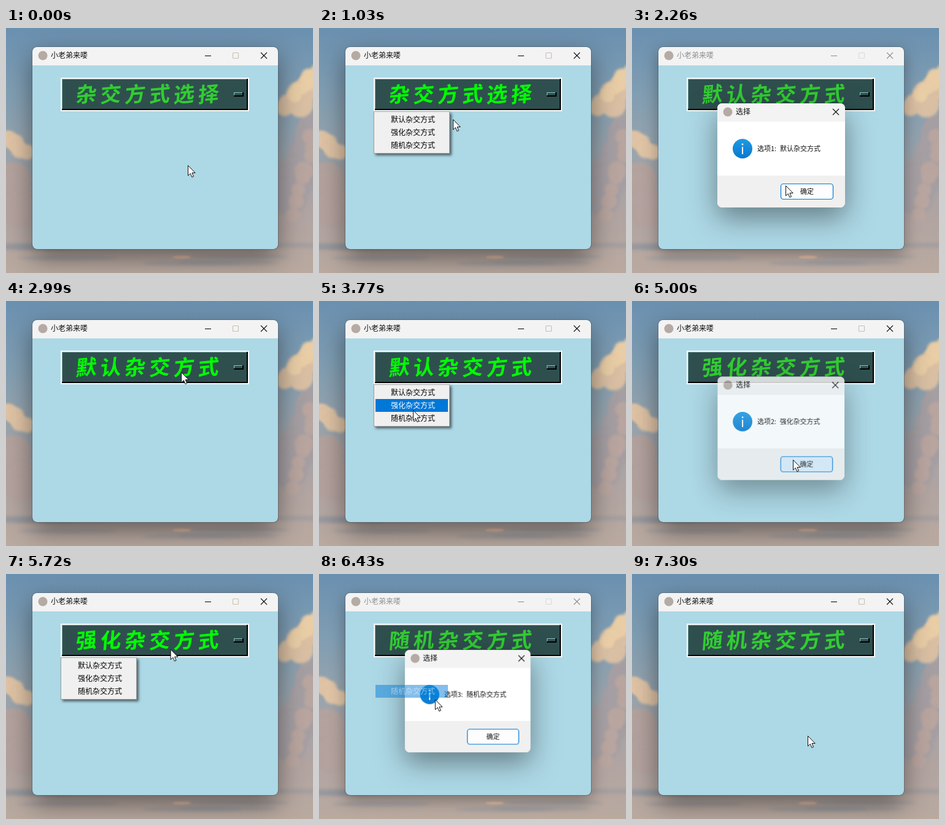
Recreate the animation shown at these times as an HTML page with a canvas. Size 500 by 400 pixels, loop 7370 ms.

```html
<!DOCTYPE html>
<html lang="zh">
<head>
<meta charset="utf-8">
<style>
html, body { margin: 0; width: 100%; height: 100%; overflow: hidden; background: #8a9aa8; }
canvas { display: block; width: 100vw; height: 100vh; }
</style>
</head>
<body>
<canvas id="stage" width="500" height="400"></canvas>
<script>
const W = 500, H = 400, LOOP = 7370;
const CJK = '"Noto Sans CJK SC", "Noto Sans CJK", sans-serif';
const BLUE = '#0078d7';
const OPTIONS = ['默认杂交方式', '强化杂交方式', '随机杂交方式'];
const START_LABEL = '杂交方式选择';
const OPEN_DELAY = 50, OPEN_TIME = 250, CLOSE_TIME = 170;

// Per option: when the menu opens, the item is picked and the dialog closes,
// and where the pointer clicks
const ROUNDS = [
  { menu: 670, pick: 1330, close: 2450, item: [178, 148], ok: [250, 257] },
  { menu: 3190, pick: 3870, close: 4975, item: [153, 178], ok: [262, 259] },
  { menu: 5600, pick: 6250, close: 6960, item: [167, 189], ok: [268, 261] }
];
const REST = [296, 224], BUTTON = [286, 113], MENU_EDGE = [218, 149], END = [286, 264];

const clamp = v => Math.max(0, Math.min(1, v));
const smooth = k => k * k * (3 - 2 * k);
const easeOut = k => 1 - (1 - k) ** 3;
const mix = (a, b, k) => a + (b - a) * k;

const stops = [
  { t: 50, p: REST },
  ...ROUNDS.flatMap(({ menu, pick, close, item, ok }) => [
    { t: menu - 150, p: BUTTON },
    { t: menu, p: BUTTON },
    { t: mix(menu, pick, 0.545), p: MENU_EDGE },
    { t: pick - 100, p: item },
    { t: pick + 40, p: item },
    { t: close - 200, p: ok },
    { t: close + 30, p: ok }
  ]),
  { t: 7130, p: END }
];

const ctx = document.getElementById('stage').getContext('2d');

function layer() {
  const c = document.createElement('canvas');
  c.width = W;
  c.height = H;
  return c.getContext('2d');
}

function rect(g, color, x, y, w, h) {
  g.fillStyle = color;
  g.fillRect(x, y, w, h);
}

function disc(g, color, x, y, rx, ry = rx) {
  g.fillStyle = color;
  g.beginPath();
  g.ellipse(x, y, rx, ry, 0, 0, Math.PI * 2);
  g.fill();
}

function rounded(g, x, y, w, h, r) {
  g.beginPath();
  g.roundRect(x, y, w, h, r);
}

// Opaque rounded panel with a soft drop shadow
function panel(g, color, x, y, w, h, alpha, blur, drop) {
  g.save();
  g.shadowColor = `rgba(0,0,0,${alpha})`;
  g.shadowBlur = blur;
  g.shadowOffsetY = drop;
  rounded(g, x, y, w, h, 8);
  g.fillStyle = color;
  g.fill();
  g.restore();
}

function text(g, str, x, y, size, color, align = 'left') {
  g.font = `${size}px ${CJK}`;
  g.textAlign = align;
  g.fillStyle = color;
  g.fillText(str, x, y);
}

function line(g, color, x1, y1, x2, y2) {
  g.strokeStyle = color;
  g.lineWidth = 1.1;
  g.beginPath();
  g.moveTo(x1, y1);
  g.lineTo(x2, y2);
  g.stroke();
}

function cross(g, color, x, y) {
  line(g, color, x, y, x + 10, y + 10);
  line(g, color, x + 10, y, x, y + 10);
}

// Raised face: light top and left, black bottom and right
function bevel(x, y, w, h, light) {
  rect(ctx, '#000', x, y, w, h);
  rect(ctx, light, x, y, w - 2, h - 2);
  rect(ctx, '#2f4f4f', x + 1, y + 1, w - 3, h - 3);
}

function pointer(t) {
  const i = stops.findIndex(s => s.t > t);
  if (i < 0) return END;
  if (i === 0) return REST;
  const a = stops[i - 1], b = stops[i];
  const k = smooth((t - a.t) / (b.t - a.t));
  return [mix(a.p[0], b.p[0], k), mix(a.p[1], b.p[1], k)];
}

function paintSky() {
  const g = layer();
  let seed = 7;
  const jitter = size => {
    seed = (seed * 16807) % 2147483647;
    return (seed / 2147483647 - 0.5) * 2 * size;
  };
  const bank = (color, x1, y1, x2, y2, count, r) => {
    for (let i = 0; i < count; i++) {
      const k = i / (count - 1);
      disc(g, color, mix(x1, x2, k) + jitter(r / 2), mix(y1, y2, k) + jitter(r / 2), r + jitter(r / 3));
    }
  };

  const grad = g.createLinearGradient(0, 0, 0, H);
  ['#6a90b0', '#7f9db2', '#98a4ad', '#b0a4a2', '#b9a99f']
    .forEach((color, i, all) => grad.addColorStop(i / (all.length - 1), color));
  rect(g, grad, 0, 0, W, H);

  g.filter = 'blur(2px)';
  bank('#a59fa3', 510, 150, 460, 270, 14, 24);
  bank('#b9a59f', 500, 180, 470, 300, 8, 12);
  bank('#d9bfa3', 510, 85, 462, 128, 14, 17);
  bank('#e8cda6', 505, 70, 470, 112, 10, 10);
  bank('#b3a29e', 0, 225, 28, 300, 12, 20);
  bank('#dfc3a5', 0, 180, 30, 198, 10, 11);
  for (let i = 0; i < 9; i++) {
    disc(g, 'rgba(140,148,158,.4)', W / 2 + jitter(W / 2), 370 + jitter(16), 80, 4);
  }
  g.filter = 'blur(1px)';
  disc(g, '#dcb7a0', 286, 374, 15, 2.5);
  return g.canvas;
}

function paintWindow(active) {
  const ink = active ? '#111' : '#8f8f8f';
  panel(ctx, '#add8e6', 43, 31, 400, 330, active ? 0.45 : 0.34, active ? 42 : 26, active ? 15 : 8);
  rounded(ctx, 43, 31, 400, 30, [8, 8, 0, 0]);
  ctx.fillStyle = '#f3f3f3';
  ctx.fill();
  rounded(ctx, 42.5, 30.5, 401, 331, 8);
  ctx.strokeStyle = 'rgba(70,80,90,.45)';
  ctx.lineWidth = 1;
  ctx.stroke();

  disc(ctx, '#b5aaa4', 60, 45, 7.5);
  text(ctx, '小老弟来喽', 73, 49, 12, ink);
  line(ctx, ink, 324, 45.5, 334, 45.5);
  ctx.strokeStyle = active ? '#c8bfb4' : '#d6dcdc';
  rounded(ctx, 369.5, 40.5, 9, 9, 1);
  ctx.stroke();
  cross(ctx, ink, 415, 40);
}

function paintButton(label, hot) {
  rect(ctx, '#f7fafa', 89, 81, 307, 55);
  bevel(91, 83, 303, 51, '#7fa3a3');
  bevel(371, 105, 16, 7, '#8fc0c0');

  // slanted bold strokes give the brush-like lettering
  ctx.font = `700 34px ${CJK}`;
  ctx.textAlign = 'center';
  ctx.fillStyle = hot ? '#00ff00' : '#32cd32';
  [...label].forEach((ch, i) => {
    ctx.save();
    ctx.transform(1, -0.09, -0.08, 1, 131 + i * 39.8, 108);
    ctx.fillText(ch, 0, 12.5);
    ctx.restore();
  });
}

function paintItem(i, lit) {
  if (lit) rect(ctx, BLUE, 92, 139 + i * 21, 118, 21);
  text(ctx, OPTIONS[i], 117, 154 + i * 21, 12, lit ? '#fff' : '#000');
}

function paintMenu(age, x, y) {
  ctx.save();
  ctx.globalAlpha = clamp(age / 120);
  ctx.save();
  ctx.shadowColor = 'rgba(0,0,0,.55)';
  ctx.shadowBlur = 4;
  ctx.shadowOffsetX = ctx.shadowOffsetY = 2.5;
  rect(ctx, '#a0a0a0', 89, 136, 124, 69);
  ctx.restore();
  rect(ctx, '#f0f0f0', 90, 137, 122, 67);
  const row = x >= 92 && x < 210 ? Math.floor((y - 139) / 21) : -1;
  OPTIONS.forEach((_, i) => paintItem(i, i === row));
  ctx.restore();
}

const dialog = layer();

function paintDialog(n, hover) {
  const g = dialog, ink = '#111';
  g.clearRect(0, 0, W, H);
  panel(g, '#fff', 139, 123, 208, 170, 0.42, 46, 17);
  rounded(g, 139, 123, 208, 30, [8, 8, 0, 0]);
  g.fillStyle = '#f3f3f3';
  g.fill();
  rounded(g, 139, 241, 208, 52, [0, 0, 8, 8]);
  g.fillStyle = '#f0f0f0';
  g.fill();
  disc(g, '#b5aaa4', 156, 137, 7.5);
  text(g, '选择', 169, 141, 12, ink);
  cross(g, ink, 327, 132);

  const blue = g.createLinearGradient(0, 181, 0, 213);
  blue.addColorStop(0, '#1f9ae3');
  blue.addColorStop(1, '#0a78cf');
  disc(g, blue, 180, 197, 16);
  disc(g, '#fff', 180, 190, 1.4);
  rect(g, '#fff', 179, 194, 2, 12);
  text(g, `选项${n + 1}:`, 204, 201, 11, ink);
  text(g, OPTIONS[n], 241, 201, 11, ink);

  rounded(g, 242.5, 254.5, 85, 25, 4);
  g.fillStyle = hover ? '#d9ebf9' : '#fdfdfd';
  g.fill();
  g.strokeStyle = BLUE;
  g.lineWidth = 1.2;
  g.stroke();
  text(g, '确定', 285, 271, 11, ink, 'center');
}

function showDialog(t, n) {
  const { pick, close } = ROUNDS[n];
  const age = t - pick - OPEN_DELAY;
  const gone = clamp((t - close) / CLOSE_TIME);
  if (age < 0 || gone === 1) return;
  const scale = mix(0.85, 1, easeOut(clamp(age / OPEN_TIME))) * (1 - 0.04 * gone);
  paintDialog(n, t > close - 180);
  ctx.save();
  ctx.globalAlpha = clamp(age / 110) * (1 - gone);
  ctx.translate(191, 180);
  ctx.scale(scale, scale);
  ctx.drawImage(dialog.canvas, -191, -180);
  ctx.restore();
}

function paintPointer(x, y) {
  const pts = [[0, 0], [0, 16.5], [3.8, 13], [6.4, 19], [9, 17.9], [6.5, 12], [11.7, 12]];
  ctx.beginPath();
  pts.forEach(([px, py]) => ctx.lineTo(x + 0.5 + px, y + 0.5 + py));
  ctx.closePath();
  ctx.fillStyle = '#fff';
  ctx.fill();
  ctx.strokeStyle = '#111';
  ctx.lineWidth = 1;
  ctx.stroke();
}

const sky = paintSky();

function draw(t) {
  const [x, y] = pointer(t);
  const menu = ROUNDS.find(r => t >= r.menu && t < r.pick);
  const modal = ROUNDS.some(r => t >= r.pick + OPEN_DELAY && t < r.close);
  const picked = ROUNDS.filter(r => t >= r.pick).length - 1;
  const label = picked < 0 ? START_LABEL : OPTIONS[picked];
  const over = x > 89 && x < 396 && y > 81 && y < 136;

  ctx.drawImage(sky, 0, 0);
  paintWindow(!modal);
  paintButton(label, Boolean(menu) || (over && !modal));
  if (menu) paintMenu(t - menu.menu, x, y);
  if (picked >= 0) {
    showDialog(t, picked);
    // the chosen row lingers and fades
    const fade = 1 - (t - ROUNDS[picked].pick) / 350;
    if (fade > 0) {
      ctx.save();
      ctx.globalAlpha = fade;
      paintItem(picked, true);
      ctx.restore();
    }
  }
  paintPointer(x, y);
}

const start = performance.now();
function tick() {
  draw((performance.now() - start) % LOOP);
  requestAnimationFrame(tick);
}
tick();
</script>
</body>
</html>
```
